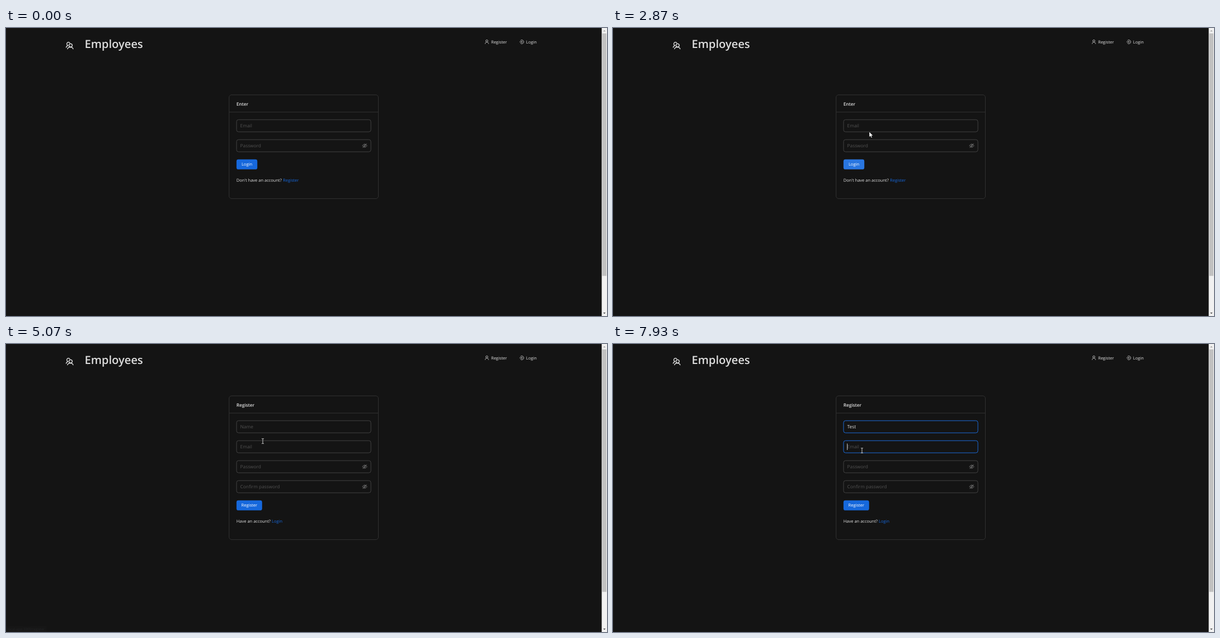
These frames come from a looping animation (1079 px wide and 519 px high, 8 s). An HTML page:

```html
<!DOCTYPE html>
<html lang="en">
<head>
<meta charset="utf-8">
<title>Employees</title>
<style>
  html, body { margin: 0; height: 100%; overflow: hidden; background: #141414; }
  svg { display: block; width: 100vw; height: 100vh; text-rendering: geometricPrecision; }
  text { font: 7.5px "Open Sans", "Noto Sans", sans-serif; fill: #e2e2e2; white-space: pre; }
  .h1 { font-size: 20.2px; font-weight: 600; fill: #dcdcdc; }
  .head { font-size: 8.2px; font-weight: 600; }
  .hint { font-size: 8.3px; fill: #525252; }
  .value { font-size: 8.3px; }
  .btn { fill: #fff; }
  .link { fill: #1668dc; }
  .status { font-size: 6.2px; fill: #9aa0a6; }
  .row, .bold, .title, .dim { font: 7.87px "Liberation Sans", Arial, sans-serif; fill: #f3f5f8; }
  .bold { font-weight: 700; }
  .title { font-size: 10.15px; font-weight: 700; }
  .dim { fill: #718096; }
</style>
</head>
<body>
<svg id="stage" viewBox="0 0 1079 519"></svg>
<script>
const stage = document.getElementById("stage");
const LOOP = 8000, STEP = 1000 / 15;   // the screen refreshes 15 times a second

// Pointer stops: tick, x, y, kind (a arrow, h hand, i text beam, - hidden)
const path = [
  [0, 0, 0, "-"],
  [7, 516, 30, "a"], [8, 517, 66, "a"], [10, 484, 9, "a"], [11, 484, 0, "-"],
  [21, 640, 90, "a"], [22, 645, 264, "a"], [24, 540, 190, "a"], [26, 429, 26, "a"], [27, 429, 0, "-"],
  [36, 520, 47, "a"], [38, 480, 130, "a"], [40, 440, 243, "h"], [42, 444, 236, "a"],
  [43, 460, 187, "a"], [46, 700, 110, "a"], [48, 880, 47, "a"],
  [49, 878, 31, "h"], [51, 876, 28, "h"], [52, 868, 40, "a"], [55, 740, 170, "a"],
  [57, 615, 262, "a"], [59, 540, 280, "a"], [60, 515, 276, "h"], [61, 511, 275, "h"],
  [65, 511, 275, "a"], [73, 511, 275, "a"], [75, 485, 215, "i"], [76, 461, 175, "i"],
  [78, 452, 152, "i"], [82, 450, 148.5, "i"], [114, 450, 148.5, "i"],
  [116, 449, 170, "i"], [118, 447, 192, "i"], [120, 447, 192, "i"]
];

const text = (s, x, y, cls, extra = "") => `<text x="${x}" y="${y}" class="${cls}" ${extra}>${s}</text>`;
const box = (x, y, w, h, fill, extra = "") =>
  `<rect x="${x}" y="${y}" width="${w}" height="${h}" fill="${fill}" ${extra}/>`;
const line = (d, color, w = 1, extra = "") =>
  `<path d="${d}" fill="none" stroke="${color}" stroke-width="${w}" ${extra}/>`;
const at = (x, y, body) => `<g transform="translate(${x} ${y})">${body}</g>`;

// Value of the last [tick, value] pair already reached
const latest = (list, n) => list.filter(([k]) => k <= n).pop()[1];

const eye = y => at(644, y,
  line("M-4.2 0Q0-6 4.2 0Q0 6-4.2 0ZM3.6-3.8L-3.6 3.8", "#737373", .9) +
  `<circle r="1.4" fill="none" stroke="#737373" stroke-width=".8"/>`);

const field = (y, hint, { value = "", focus = false, caret = false, secret = false } = {}) =>
  box(413.9, y, 241.2, 21.9, "#141414", `rx="3.6" stroke="${focus ? "#1d6bd8" : "#424242"}"`) +
  (value ? text(value, 420.6, y + 14.1, "value") : text(hint, 420.6, y + 14.1, "hint")) +
  (caret ? box(420.2 + 4 * value.length, y + 5.2, .9, 11.6, "#dcdcdc") : "") +
  (secret ? eye(y + 10.9) : "");

const card = (y, h, head) =>
  box(400.5, y, 268, h, "none", `rx="4.5" stroke="#303030"`) +
  line(`M400.5 ${y + 31}H668.5`, "#303030") + text(head, 413.8, y + 19, "head");

const button = (y, w, label, fill) =>
  box(413.8, y, w, 18, fill, `rx="3.4"`) + text(label, 413.8 + w / 2, y + 11.6, "btn", `text-anchor="middle"`);

function frame() {
  return box(0, 0, 1079, 519, "#141414") +
    line("M110.3 38.3C110.6 33.3 120.2 33.3 120.6 38.3M108 35.5C108.2 33.3 109.6 32 111.6 31.6" +
      "M111.4 31.5A3 3 0 1 1 114.9 27.4", "#f0f0f0", 1.25) +
    `<circle cx="116" cy="31.2" r="2.9" fill="none" stroke="#f0f0f0" stroke-width="1.25"/>` +
    text("Employees", 141.3, 35.6, "h1") +
    at(863.3, 25, `<circle cy="-1.7" r="1.9" fill="none" stroke="#dcdcdc" stroke-width=".8"/>` +
      line("M-3.1 3.7C-2.8-.6 2.8-.6 3.1 3.7", "#dcdcdc", .8)) +
    text("Register", 871, 28.2, "") +
    at(926, 25, line("M-2.5-2.2A3.4 3.4 0 1 1-2.5 2.2M-4 0H1M-.4-1.4L1.1 0L-.4 1.4", "#dcdcdc", .8)) +
    text("Login", 933.8, 28.2, "") +
    box(1069.5, 0, 9.5, 519, "#f1f1f1") + box(1070.5, 9.7, 7.5, 437, "#c1c1c1") +
    `<path d="M1072 6.2L1074.3 3.8L1076.6 6.2Z" fill="#a3a3a3"/>` +
    `<path d="M1072 512.8L1074.3 515.2L1076.6 512.8Z" fill="#505050"/>`;
}

function loginPage(n) {
  const fill = latest([[0, "#1668dc"], [40, "#2a79e2"], [41, "#3c89e8"], [43, "#2976e0"], [44, "#1668dc"]], n);
  return frame() + card(120.5, 187, "Enter") +
    field(165.2, "Email") + field(201.2, "Password", { secret: true }) +
    button(236.8, 37.4, "Login", fill) +
    text("Don't have an account?", 413.8, 277.2, "") + text("Register", 497.3, 277.2, "link");
}

function registerPage(n) {
  const value = latest([[0, ""], [99, "T"], [101, "Te"], [106, "Tes"], [108, "Test"]], n);
  const caret = latest([[0, false], [80, true], [89, false], [97, true], [114, false]], n);
  const onEmail = n >= 118;
  return frame() + card(93.5, 259, "Register") +
    field(138.2, "Name", { value, caret, focus: n >= 79 }) +
    field(174.2, "Email", { focus: onEmail, caret: onEmail }) +
    field(210.2, "Password", { secret: true }) +
    field(246.2, "Confirm password", { secret: true }) +
    button(281.8, 46, "Register", "#1668dc") +
    text("Have an account?", 413.8, 322.4, "") + text("Login", 477, 322.4, "link");
}

function modelsPage(focused) {
  const row = (name, y) => text(name, 427.8, y, "row") + text("0", 651.3, y, "dim", `text-anchor="end"`);
  return box(0, 0, 1079, 519, "#141720") + box(0, 0, 1079, 19, "#0c0e13") +
    line("M0 19.7H1079", "#272d3a") +
    box(18, 1, 19, 18, "#2d3748") + line("M25 10H30.4M27.7 7.3V12.7", "#718096", .9) +
    at(1059.3, 10, `<circle r="2.5" fill="none" stroke="#dde2ea" stroke-width="2.2"/>` +
      `<circle r="3.8" fill="none" stroke="#dde2ea" stroke-width="1.4" stroke-dasharray="1.6 1.385"/>`) +
    box(405, 34.5, 269, 470, "#141720", `stroke="#191d27"`) +
    line("M405 111.5H674M405 193H674", "#191d27") +
    text("Open a Model", 539.5, 65.8, "title", `text-anchor="middle"`) +
    box(427.8, 80, 223.7, 20, "#1a202c") + text("Search", 434.6, 92.9, "dim") +
    (focused ? box(434, 85.3, .9, 9.4, "#f3f5f8") + box(422.3, 141, 234.5, 14, "#1a202c") : "") +
    text("Recently Opened", 427.8, 132.8, "bold") + row("User", 150.8) + row("Employee", 165.4) +
    text("All Models", 427.8, 214.4, "bold") + row("Employee", 232.4) + row("User", 246.9);
}

const shapes = {
  a: `<path d="M0 0V9.6L2.2 7.6L3.7 11L5.3 10.3L3.9 7.1H6.9Z" fill="#fff" stroke="#000" stroke-width=".5"/>`,
  h: `<path d="M-.9 0Q0-.9.9 0V3.6L4.6 4.8Q5.4 5.2 5.2 6.4L4.2 10.4H-.8L-3.4 6.4Q-3.4 5.2-2.2 5.6L-.9 6.8Z"
      fill="#fff" stroke="#000" stroke-width=".5"/>`,
  i: line("M-2-4.4H-.6L0-4L.6-4.4H2M0-4V4M-2 4.4H-.6L0 4L.6 4.4H2", "#dedede", .9),
  "-": ""
};

function pointer(n) {
  const i = path.findLastIndex(p => p[0] <= n);
  const [t, x, y, kind] = path[i], next = path[i + 1];
  const still = next[3] === "-" || kind === "-";
  const k = still ? 0 : (n - t) / (next[0] - t);
  // a visible wait between two far stops only happens while hidden
  return at(x + (next[1] - x) * k, y + (next[2] - y) * k, shapes[kind]);
}

function status(n) {
  const alpha = latest([[0, 0], [50, .5], [51, 1], [55, .6], [56, .3], [57, .1], [58, 0],
    [62, .5], [63, 1], [74, .6], [75, .3], [76, .1], [77, 0]], n);
  return alpha ? `<g opacity="${alpha}">${box(0, 508.5, 73, 10.5, "#292a2d")}${
    text("local-app:3000/register", 3, 516, "status")}</g>` : "";
}

function page(n) {
  if (n >= 65) return registerPage(n);
  if (n >= 16 && n < 33) return modelsPage(n >= 31);
  return loginPage(n);
}

let shown = -1;
function tick(now) {
  const n = Math.min(119, Math.floor((now % LOOP + 4) / STEP));
  if (n !== shown) {
    shown = n;
    stage.innerHTML = page(n) + status(n) + pointer(n);
  }
  requestAnimationFrame(tick);
}
tick(performance.now());
</script>
</body>
</html>
```
